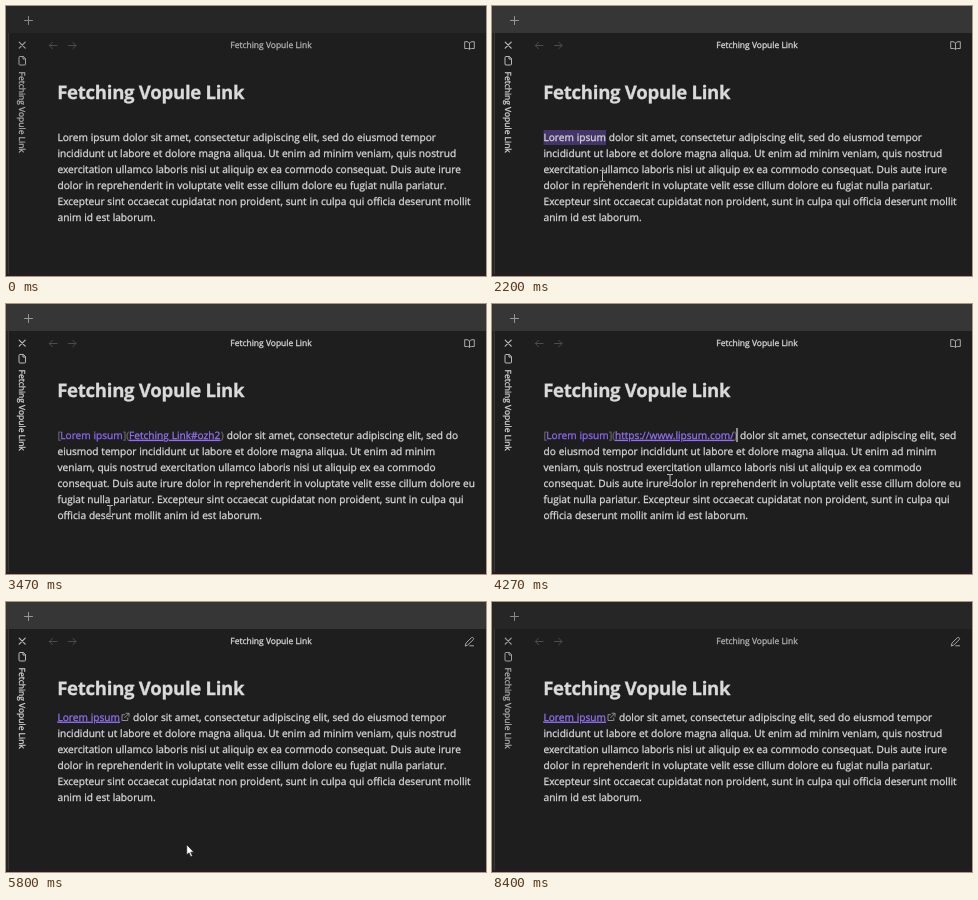
These frames come from a looping animation (480 by 270 pixels, 8.47 s). An HTML page:

```html
<!DOCTYPE html>
<html lang="en">
<head>
<meta charset="utf-8">
<title>Note editor</title>
<style>
  html, body { margin: 0; width: 100%; height: 100%; overflow: hidden; background: #1e1e1e; }
  svg { display: block; width: 480px; height: 270px; }
  text {
    font-family: "Open Sans", "Noto Sans", sans-serif; white-space: pre; text-rendering: geometricPrecision;
    color: #dadada; fill: currentColor; stroke: currentColor; stroke-width: .28px;
  }
  .body text { font-size: 10.13px; word-spacing: .2px; }
  .small { font-size: 8.49px; }
  .head { font-size: 18.6px; font-weight: 700; letter-spacing: -.29px; }
  .line { fill: none; stroke-linecap: round; stroke-linejoin: round; }
  .mark { color: #666; }
  .link { color: #8f68f5; }
  .url { color: #9672f6; text-decoration: underline; }
  .hover { color: #b5a0fb; }
</style>
</head>
<body>
<svg viewBox="0 0 480 270">
  <rect width="480" height="270" fill="#1e1e1e"/>
  <rect id="bar" width="480" height="27" fill="#262626"/>
  <rect y="27" width="2" height="241" fill="#262626"/>
  <path d="M2.5 27V268" stroke="#363636"/>
  <rect y="268" width="480" height="2" fill="#2a1a21"/>

  <g class="line" stroke-width="1">
    <path id="plus" d="M18.5 14.5h8M22.5 10.5v8"/>
    <path id="close" d="M13.2 36.2l6 6M19.2 36.2l-6 6" stroke-width="1.2"/>
    <path id="page" d="M17 50.5h-3q-1 0-1 1v6.5q0 1 1 1h4.5q1 0 1-1V53zv2.5h2.5"/>
    <path d="M51 39.5h-7.5M46.5 36.3l-3.2 3.2 3.2 3.2M62.5 39.5h7.5M66.8 36.3l3.2 3.2-3.2 3.2" stroke="#4c4c4c"/>
    <path id="book" stroke="#a8a8a8" d="M463.5 37.2q-1-1.5-2.5-1.5h-2.3v6.8h3q1.3 0 1.8 1 .5-1 1.8-1h3v-6.8H466q-1.5 0-2.5 1.5zv6"/>
    <path id="pen" stroke="#a8a8a8" d="M459.3 43.7l.8-2.8 5.3-5.2q1-.7 1.8.1t.1 1.8l-5.3 5.2zM463.8 43.8h3.7"/>
  </g>

  <text id="title" class="small" x="265" y="42.3" text-anchor="middle">Fetching Vopule Link</text>
  <text id="tab" class="small" transform="translate(13 65.5) rotate(90)">Fetching Vopule Link</text>
  <text class="head" x="51.2" y="93.4">Fetching Vopule Link</text>

  <rect id="sel" x="51.5" y="124" height="15" fill="#8a5cf5" fill-opacity=".35"/>
  <g id="views" class="body"></g>
  <rect id="caret" width="1" height="14" fill="#fff"/>

  <g id="ibeam" class="line">
    <path d="M-2.5-5.5h1.7l.8.6.8-.6h1.7M0-5V5M-2.5 5.5h1.7l.8-.6.8.6h1.7" stroke="#111" stroke-width="2"/>
    <path d="M-2.5-5.5h1.7l.8.6.8-.6h1.7M0-5V5M-2.5 5.5h1.7l.8-.6.8.6h1.7" stroke="#ddd" stroke-width=".9"/>
  </g>
  <path id="arrow" d="M0 0v10.2l2.3-2.1 1.7 3.9 1.7-.8-1.7-3.7h3.1z" fill="#fff" stroke="#111" stroke-width=".6"/>
  <path id="hand" d="M-.9 0q.9-1 1.8 0v4.3l4 .9q1.3.4 1.1 1.8l-.8 3.8-.8 2h-4.8l-1-2-2.3-3.3q-.3-1.3 1-1.1l1.8 1.5z" fill="#fff" stroke="#111" stroke-width=".6"/>
</svg>

<script>
const LOOP = 8470, LEFT = 51.5, STEP = 16.1;
const FOCUS = 630, SELECT = 1400, LINK = 2730, URL_IN = 3930, READ = 4870, BLUR = 8330;
const $ = id => document.getElementById(id);
const show = (id, on) => $(id).style.display = on ? "" : "none";

const plain = [
  "incididunt ut labore et dolore magna aliqua. Ut enim ad minim veniam, quis nostrud",
  "exercitation ullamco laboris nisi ut aliquip ex ea commodo consequat. Duis aute irure",
  "dolor in reprehenderit in voluptate velit esse cillum dolore eu fugiat nulla pariatur.",
  "Excepteur sint occaecat cupidatat non proident, sunt in culpa qui officia deserunt mollit",
  "anim id est laborum."
];
const shifted = [
  "eiusmod tempor incididunt ut labore et dolore magna aliqua. Ut enim ad minim",
  "veniam, quis nostrud exercitation ullamco laboris nisi ut aliquip ex ea commodo",
  "consequat. Duis aute irure dolor in reprehenderit in voluptate velit esse cillum dolore eu",
  "fugiat nulla pariatur. Excepteur sint occaecat cupidatat non proident, sunt in culpa qui",
  "officia deserunt mollit anim id est laborum."
];
const start = "dolor sit amet, consectetur adipiscing elit, sed";

const span = (x, s, cls = "") => `<tspan x="${x}" class="${cls}">${s}</tspan>`;
const markdown = (url, end, rest) =>
  span(LEFT, "[", "mark") + span(54.3, "Lorem ipsum", "link") + span(117, "](", "mark") +
  span(123, url, "url") + span(end, ")", "mark") + span(end + 6, rest);

function view(id, top, first, rest) {
  const rows = [first, ...rest.map(s => span(LEFT, s))];
  return `<g id="${id}">` + rows.map((s, i) =>
    `<text y="${top + i * STEP}">${s}</text>`).join("") + "</g>";
}

$("views").innerHTML =
  view("raw", 134.95, span(LEFT, `Lorem ipsum ${start} do eiusmod tempor`), plain) +
  view("pending", 134.95, markdown("Fetching Link#ozh2", 214.7, start + " do"), shifted) +
  view("linked", 134.95, markdown("https://www.lipsum.com/", 242, start),
    ["do " + shifted[0], ...shifted.slice(1)]) +
  view("reading", 118.85, `<tspan id="anchor" x="${LEFT}" class="url">Lorem ipsum</tspan>` +
    span(127, start + " do eiusmod tempor"), plain);
$("reading").insertAdjacentHTML("beforeend",
  '<path class="line" stroke="#999" stroke-width=".9" d="M118.5 112.7h-2.5v5.8h5.8v-2.5M120 111.3h3v3M123 111.3l-4.3 4.3"/>');

// time, x, y of the pointer
const path = [
  [70, -8, 210], [500, 95, 170], [630, 100, 163], [870, 100, 163],
  [1130, 87, 136], [1330, 54, 133], [1400, 54, 133], [1700, 116, 133],
  [1860, 116, 133], [2500, 106, 200], [2930, 104, 207], [3530, 104, 207],
  [4150, 178, 176], [4529, 178, 176], [4530, 178, 179], [4800, 178, 179],
  [5070, 188, 245], [5250, 190, 256], [5500, 189, 253], [5730, 189, 253],
  [6130, 90, 129], [6400, 90, 129], [6600, 89, 121], [7000, 89, 121], [7400, -14, 238]
];

function pointer(t) {
  const i = path.findIndex(p => p[0] > t);
  if (i < 1) return null;
  const [t0, x0, y0] = path[i - 1], [t1, x1, y1] = path[i];
  const k = (t - t0) / (t1 - t0), e = k * k * (3 - 2 * k);
  return [x0 + (x1 - x0) * e, y0 + (y1 - y0) * e];
}

function shape([x, y], reading) {
  if (reading && x > 50 && x < 115 && y > 108 && y < 124) return "hand";
  return x > 48 && y < (reading ? 203 : 264) ? "ibeam" : "arrow";
}

const mix = (a, b, k) => {
  const v = Math.round(a + (b - a) * k);
  return `rgb(${v},${v},${v})`;
};

function draw(t) {
  const reading = t >= READ;
  show("raw", t < LINK);
  show("pending", t >= LINK && t < URL_IN);
  show("linked", t >= URL_IN && !reading);
  show("reading", reading);
  show("book", !reading);
  show("pen", reading);

  const lit = t < FOCUS ? 0 : t < BLUR ? 1 : t < BLUR + 70 ? 0.5 : 0;
  $("bar").setAttribute("fill", mix(38, 54, lit));
  for (const id of ["title", "tab"]) $(id).style.color = mix(179, 218, lit);
  $("plus").style.stroke = mix(135, 150, lit);
  for (const id of ["close", "page"]) $(id).style.stroke = mix(160, 186, lit);

  const pos = pointer(t), kind = pos && shape(pos, reading);
  for (const id of ["ibeam", "arrow", "hand"]) {
    show(id, id === kind);
    if (id === kind) $(id).setAttribute("transform", `translate(${pos[0]} ${pos[1]})`);
  }
  $("anchor").classList.toggle("hover", kind === "hand");

  const selecting = t >= SELECT && t < LINK;
  const head = t < 1700 && pos ? Math.min(114, Math.max(52, pos[0])) : 114;
  show("sel", selecting);
  $("sel").setAttribute("width", head - LEFT);

  const [since, x, y] = t < SELECT ? [FOCUS, 100, 157] : t < LINK ? [SELECT, head, 124.5] :
    t < URL_IN ? [LINK, 218, 124] : [URL_IN, 244.5, 124];
  show("caret", t >= FOCUS && !reading && (t - since) % 1200 < 600);
  $("caret").setAttribute("x", x);
  $("caret").setAttribute("y", y);
}

const origin = performance.now();
function tick() {
  draw((performance.now() - origin) % LOOP);
  requestAnimationFrame(tick);
}
tick();
</script>
</body>
</html>
```
